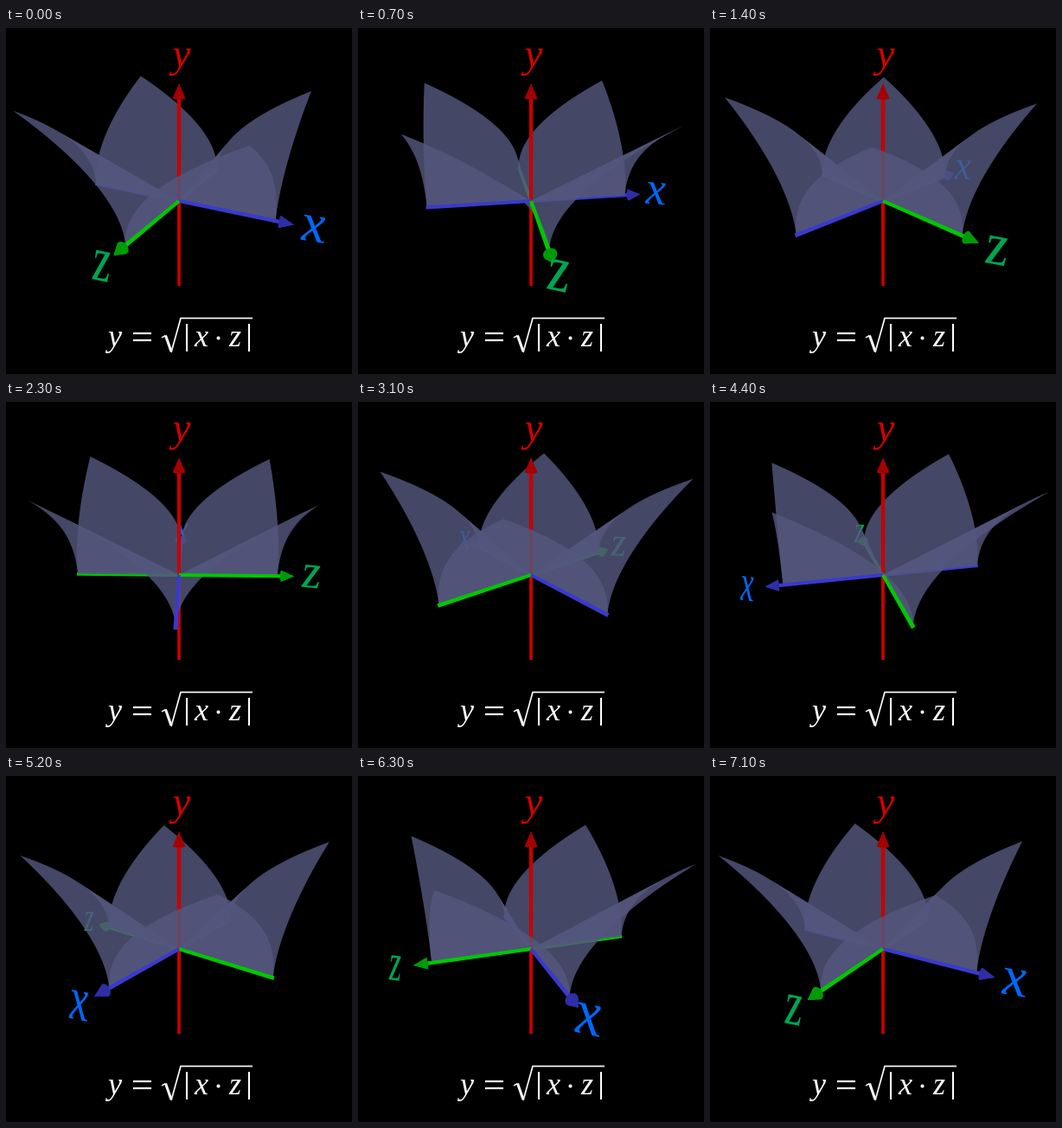
A matplotlib script that plays this animation: 400 by 400 pixels, repeating every 7.2 s.

```python
import numpy as np
import matplotlib.pyplot as plt
from matplotlib.animation import FuncAnimation
from matplotlib.collections import PathCollection
from matplotlib.path import Path
from matplotlib.textpath import TextPath

SIZE, FRAMES, INTERVAL = 400, 72, 100

# camera: scale, distance and elevation
FOCAL, DIST = 490, 4.25
SIN_E = 0.415
COS_E = np.sqrt(1 - SIN_E ** 2)
START = np.radians(26.5)

# reach of the surface along the positive and negative half axes
POS, NEG = 0.98, 1.02
SHAFT_R, CONE_R, CONE_BASE, CONE_TIP, LABEL_AT = 0.0175, 0.057, 1.02, 1.145, 1.312

SURFACE = (84 / 255, 87 / 255, 125 / 255, 0.82)
STYLE = {  # shaft, cone and label colours
    "x": ("#3a3acc", "#2e2ea6", "#0068fa"),
    "y": ("#c80000", "#a60000", "#d80000"),
    "z": ("#00c800", "#009a08", "#00a550"),
}
SERIF = {"family": "Liberation Serif", "style": "italic"}


def rgba(color, alpha=1):
    return plt.matplotlib.colors.to_rgba(color, alpha)


def project(p):
    """Map (right, toward viewer, up) to stage pixels."""
    u, w, h = np.moveaxis(np.asarray(p, float), -1, 0)
    d = DIST - w * COS_E - h * SIN_E
    x = SIZE / 2 + FOCAL * u / d
    y = SIZE / 2 - FOCAL * (h * COS_E - w * SIN_E) / d
    return np.stack([x, y], -1)


def nearness(p):
    """Order of lines through the origin that share a screen direction."""
    u, w, h = np.moveaxis(np.asarray(p, float), -1, 0)
    return (w * COS_E + h * SIN_E) / np.hypot(u, h * COS_E - w * SIN_E)


def polygon(pts):
    return Path(np.vstack([pts, pts[:1]]), closed=True)


def glyph(char):
    path = TextPath((0, 0), char, size=100, prop=SERIF)
    box = path.get_extents()
    center = [(box.x0 + box.x1) / 2, (box.y0 + box.y1) / 2]
    return Path((path.vertices - center) / 100, path.codes)


GLYPHS = {c: glyph(c) for c in "xyz"}


def petal(ex, ez, lx, lz):
    """Parts of one quadrant, cut where its silhouette folds over."""
    s = np.linspace(0, 1, 60)[:, None]
    up = np.array([0, 0, np.sqrt(lx * lz)])
    first = ex * lx + ez * lz * s ** 2 + up * s
    second = ex * lx * s ** 2 + ez * lz + up * s
    rim = np.vstack([first, second[-2::-1]])

    v = rim[:, 2] * COS_E - rim[:, 1] * SIN_E
    turn = np.sign(np.diff(np.unwrap(np.arctan2(v, rim[:, 0]))))
    cuts = np.flatnonzero(turn[1:] != turn[:-1]) + 1
    ends = [0, *cuts, len(rim) - 1]

    parts = []
    for a, b in zip(ends[:-1], ends[1:]):
        run = rim[a:b + 1]
        shape = polygon(project(np.vstack([np.zeros(3), run])))
        parts.append((nearness(run).mean(), [(shape, SURFACE)]))
    return parts


def shaft(direction, length, color):
    ends = project([np.zeros(3), direction * length])
    along = ends[1] - ends[0]
    side = np.array([-along[1], along[0]]) / np.hypot(*along)
    depth = DIST - length * (direction[1] * COS_E + direction[2] * SIN_E)
    r0, r1 = SHAFT_R * FOCAL / DIST, SHAFT_R * FOCAL / depth
    pts = [ends[0] + side * r0, ends[1] + side * r1,
           ends[1] - side * r1, ends[0] - side * r0]
    return [(polygon(np.array(pts)), rgba(color))]


def cone(direction, color):
    helper = np.array([0, 0, 1.0]) if direction[2] == 0 else np.array([1.0, 0, 0])
    p = np.cross(direction, helper)
    q = np.cross(direction, p)
    t = np.linspace(0, 2 * np.pi, 16, endpoint=False)[:, None]
    ring = project(direction * CONE_BASE + CONE_R * (p * np.cos(t) + q * np.sin(t)))
    tip = project(direction * CONE_TIP)
    shapes = [polygon(ring)]
    shapes += [polygon(np.array([tip, ring[k], ring[k + 8]])) for k in range(8)]
    return [(s, rgba(color)) for s in shapes]


def label(name, direction, color):
    g = GLYPHS[name]
    if name == "y":
        at, em, width, slope = np.array([201, 39.5]), 47, 1, 0
    else:
        spot = direction * LABEL_AT
        at = project(spot)
        angle = np.arctan2(direction[1], direction[0])
        em = 0.49 * FOCAL / (DIST - spot[1] * COS_E)
        width = 0.78 + 0.22 * np.cos(angle - 0.17)
        slope = 0.1 + 0.12 * np.sin(angle)
    x = g.vertices[:, 0] * em * width
    y = -g.vertices[:, 1] * em + x * slope
    return [(Path(np.column_stack([x, y]) + at, g.codes), rgba(color))]


def half_axis(name, direction, positive):
    rod, head, ink = STYLE[name]
    shapes = shaft(direction, 1.02 if positive else 1.03, rod)
    in_front = direction[1] > 0
    if positive:
        text = label(name, direction, ink)
        tip = cone(direction, head)
        shapes = shapes + tip + text if in_front else text + shapes + tip
    key = 100 + direction[1] if in_front else nearness(direction)
    return [(key, shapes)]


def scene(i):
    a = START - 2 * np.pi * i / FRAMES
    ex = np.array([np.cos(a), np.sin(a), 0])
    ez = np.array([-np.sin(a), np.cos(a), 0])
    ey = np.array([0, 0, 1.0])
    groups = []
    for name, e in (("x", ex), ("y", ey), ("z", ez)):
        groups += half_axis(name, e, True) + half_axis(name, -e, False)
    for sx, lx in ((1, POS), (-1, NEG)):
        for sz, lz in ((1, POS), (-1, NEG)):
            groups += petal(sx * ex, sz * ez, lx, lz)
    groups.sort(key=lambda g: g[0])
    return [item for _, shapes in groups for item in shapes]


fig = plt.figure(figsize=(4, 4), dpi=100, facecolor="black")
ax = fig.add_axes([0, 0, 1, 1])
ax.set_xlim(0, SIZE)
ax.set_ylim(SIZE, 0)
ax.axis("off")


def formula():
    for char, x in (("y", 125.5), ("x", 225), ("z", 264)):
        ax.text(x, 367.5, char, color="white", fontsize=26, ha="center",
                va="baseline", **SERIF)
    line = dict(color="white", solid_capstyle="butt", solid_joinstyle="miter")
    for y in (353, 361):
        ax.plot([147, 168], [y, y], lw=1.6, **line)
    for x in (208.5, 280.5):
        ax.plot([x, x], [342, 374], lw=1.5, **line)
    ax.plot([180, 184.5], [358, 355.5], lw=1.1, **line)
    ax.plot([184.5, 191], [355.5, 374], lw=2.2, **line)
    ax.plot([191, 202, 285], [375, 335.5, 335.5], lw=1.2, **line)
    ax.plot([245], [357.5], "o", color="white", ms=2.9, mew=0)


formula()
shapes = PathCollection([], linewidths=0, edgecolors="none")
ax.add_collection(shapes, autolim=False)


def draw(i):
    paths, colors = zip(*scene(i))
    shapes.set_paths(paths)
    shapes.set_facecolor(colors)
    return [shapes]


anim = FuncAnimation(fig, draw, frames=FRAMES, interval=INTERVAL,
                     repeat=True, repeat_delay=0)
plt.show()
```
